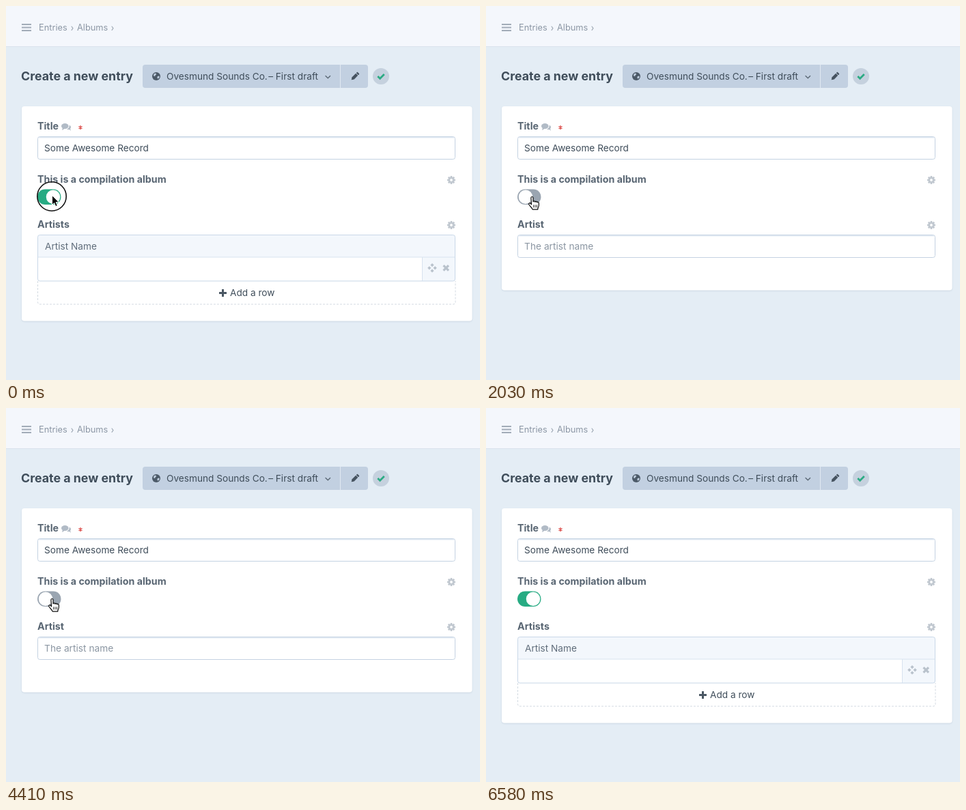
Recreate the animation shown at these times as an HTML page. Size 694 px wide and 548 px high, loop 6650 ms.

```html
<!DOCTYPE html>
<html lang="en">
<head>
<meta charset="utf-8">
<title>Entry form</title>
<style>
  html, body { margin: 0; width: 100%; height: 100%; overflow: hidden; background: #e4edf5; }
  svg { display: block; width: 100%; height: 100%; }
  text { font: 13.65px Inter, "Open Sans", sans-serif; fill: #3f4d5a; white-space: pre; }
  .crumb { font-size: 12.8px; fill: #8c97a5; }
  .heading { font-size: 17.8px; font-weight: 700; }
  .label { font-size: 14.25px; font-weight: 700; fill: #596673; }
  .column { fill: #606d7b; }
  .hint { font-size: 13.75px; fill: #8c97a3; }
  .field { fill: #fff; stroke: #c4d2e2; }
  .line { fill: none; stroke-linecap: round; stroke-linejoin: round; }
</style>
</head>
<body>
<svg viewBox="0 0 694 548" xmlns="http://www.w3.org/2000/svg">
  <defs>
    <filter id="shadow" x="-5%" y="-5%" width="110%" height="110%">
      <feDropShadow dx="0" dy="1" stdDeviation="1.2" flood-color="#8fa3b8" flood-opacity=".3"/>
    </filter>
    <g id="gear">
      <g stroke="#c1c8d0" stroke-width="2.6">
        <path d="M0-6V6M-6 0H6"/>
        <path d="M0-6V6M-6 0H6" transform="rotate(45)"/>
      </g>
      <circle r="3.2" fill="none" stroke="#c1c8d0" stroke-width="2.8"/>
      <circle r="1.9" fill="#fff"/>
    </g>
    <g id="field">
      <rect class="field" x="46.5" width="611" height="33" y=".5" rx="3"/>
      <path d="M48 1.7H656" stroke="#e2eaf3" stroke-width="1.4"/>
    </g>
  </defs>

  <rect width="694" height="548" fill="#e4edf5"/>
  <rect width="694" height="59" fill="#f4f7fc"/>
  <path d="M0 59.5H694" stroke="#d9e2ec"/>
  <path d="M23 27H37M23 31.5H37M23 36H37" stroke="#a2acb8" stroke-width="2"/>
  <text class="crumb" x="48" y="36">Entries</text>
  <text class="crumb" x="104" y="36">Albums</text>
  <path class="line" d="M96 30l2 2.700-2 2.700M155 30l2 2.700-2 2.700" stroke="#9ca6b2" stroke-width="1.1"/>

  <text class="heading" x="22" y="109">Create a new entry</text>
  <rect x="200" y="86" width="330" height="34" rx="4" fill="#c2d0e1"/>
  <path d="M489.500 86V120" stroke="#e1e9f2"/>
  <circle cx="220" cy="103" r="6" fill="#4c5a68"/>
  <path d="M216.500 99.500l2.500-1 1.300 1.600-1.700 1.300-.5 1.600-2-.4zM221.500 103.500l2.600-1.200.7 2-2 2.400-1.300-1.300z" fill="#c2d0e1"/>
  <text x="235" y="108">Ovesmund Sounds Co.</text>
  <text x="457" y="108" text-anchor="end">– First draft</text>
  <path class="line" d="M468 102.500l3.300 3.200 3.300-3.200" stroke="#596673" stroke-width="1.300"/>
  <g transform="translate(511 103) rotate(45)" fill="#45525f">
    <path d="M-2.200-3.800H2.200V4L0 7.500-2.200 4z"/>
    <rect x="-2.200" y="-7" width="4.400" height="2.300" rx=".8"/>
  </g>

  <g id="saved">
    <circle cx="549" cy="103" r="12" fill="#c5d1de"/>
    <path d="M544.300 103l3.300 3.300 6.200-6.300" fill="none" stroke="#2dab84" stroke-width="2.700"/>
  </g>
  <g id="spinner" transform="translate(548 102.500)"></g>

  <rect id="panel" x="23" y="147" width="659.500" rx="4" fill="#fff" filter="url(#shadow)"/>
  <text class="label" x="46" y="181">Title</text>
  <g fill="#b1bbc6">
    <path d="M89 180.500c3 1.500 6 0 6-3 0-1.500-1-2.600-2.300-3.100.3 3.600-1.700 5.300-3.700 6.100zM92 180.500l3 2.200-1-3z"/>
    <ellipse cx="86.300" cy="176" rx="5.300" ry="4"/>
    <path d="M83 178l-1 4 4-2.200z"/>
  </g>
  <path d="M109 175V181M106.400 176.500l5.200 3M111.600 176.500l-5.200 3" stroke="#dc4d4a" stroke-width="1.300"/>
  <use href="#field" y="191"/>
  <text x="56" y="213">Some Awesome Record</text>

  <text class="label" x="46" y="259">This is a compilation album</text>
  <use href="#gear" x="652" y="255"/>
  <use href="#gear" x="652" y="321"/>
  <rect id="track" x="46" y="268.500" width="34.500" height="22.500" rx="11.250"/>
  <circle id="knob" cy="279.750" r="10.250" fill="#fff"/>

  <g id="single">
    <text class="label" x="46" y="325">Artist</text>
    <use href="#field" y="335"/>
    <text class="hint" x="56" y="357">The artist name</text>
  </g>

  <g id="multiple">
    <text class="label" x="46" y="325">Artists</text>
    <path d="M46.500 403V433.500q0 3.500 3.500 3.500H654.500q3.500 0 3.500-3.500V403" fill="none" stroke="#d3dae2" stroke-dasharray="3 2"/>
    <rect x="46.500" y="335.500" width="611" height="67.500" rx="3" fill="#f3f7fc"/>
    <rect x="47" y="368" width="563" height="34.500" fill="#fff"/>
    <path d="M47 368H657.500M609.500 368V403" stroke="#d8e3ef"/>
    <rect x="46.500" y="335.500" width="611" height="67.500" rx="3" fill="none" stroke="#c9d8e8"/>
    <text class="column" x="57" y="357">Artist Name</text>
    <path d="M624 377l2.600 2.600-2.600 2.600-2.600-2.600zM624 385.400l2.600 2.600-2.600 2.600-2.600-2.600zM619.800 381.200l2.600 2.600-2.600 2.600-2.600-2.600zM628.200 381.200l2.600 2.600-2.600 2.600-2.600-2.600z" fill="#b9c2cc"/>
    <path d="M640.500 380.200l7.500 7.500M648 380.200l-7.500 7.500" stroke="#b9c2cc" stroke-width="3.200"/>
    <path d="M317.500 415V426M312 420.500H323" stroke="#4a5763" stroke-width="3"/>
    <text x="328" y="425">Add a row</text>
  </g>

  <circle id="ring" cx="67" cy="279" r="21.200" fill="none" stroke="#111" stroke-width="1.600"/>
  <path id="arrow" d="M67.500 277.500V291.500l3.100-2.900 2.200 5 2.500-1.100-2.200-4.900h4.300z" fill="#000" stroke="#fff"/>
  <g id="hand" transform="translate(67 279.500) scale(1.13) translate(-67 -279.500)">
    <path class="line" d="M66 281c0-2 2.800-2 2.800 0v5c.4-1.300 2.500-1.100 2.500.3.400-1.100 2.400-.9 2.400.5.500-.9 2.500-.5 2.500 1v2.600c0 2.300-1.400 3-1.500 5.600h-6.700c-.6-2.200-3.200-4-4.600-6.300-1-1.700.8-2.800 2-1.500l1.200 1.300z" style="fill:#fff" stroke="#111" stroke-width="1.100"/>
    <path d="M69.400 290V293.500M71.500 290V293.500M73.600 290V293.500" stroke="#111" stroke-width=".8"/>
  </g>
</svg>
<script>
const LOOP = 6650, STEP = 70;
const SLIDE = 210;
const KNOB_ON = 69, KNOB_OFF = 58;

// Each click flips the switch and saves the draft until `done`.
const clicks = [
  { at: 770, done: 1190, on: false },
  { at: 2100, done: 2450, on: true },
  { at: 3390, done: 3850, on: false },
  { at: 4590, done: 4900, on: true }
];

const el = id => document.getElementById(id);
const show = (id, visible) => el(id).setAttribute("display", visible ? "inline" : "none");
const clamp = v => Math.max(0, Math.min(1, v));
const swing = p => 0.5 - Math.cos(Math.PI * p) / 2;

const spokes = Array.from({ length: 12 }, (_, i) => {
  const spoke = document.createElementNS("http://www.w3.org/2000/svg", "path");
  spoke.setAttribute("d", "M0-4.500V-8.800");
  spoke.setAttribute("class", "line");
  spoke.setAttribute("stroke", "#7d8998");
  spoke.setAttribute("stroke-width", 1.2);
  spoke.setAttribute("transform", `rotate(${i * 30})`);
  return el("spinner").appendChild(spoke);
});

function drawSpinner(age) {
  const head = Math.floor(age / STEP);
  spokes.forEach((spoke, i) => {
    const lag = (head - i + 12) % 12;
    spoke.setAttribute("opacity", Math.max(0.08, 0.9 - lag * 0.09));
  });
}

function drawSwitch(on, progress) {
  const from = on ? KNOB_OFF : KNOB_ON;
  const to = on ? KNOB_ON : KNOB_OFF;
  el("knob").setAttribute("cx", from + (to - from) * swing(progress));
  el("track").setAttribute("fill", on ? "#27ab83" : "#9aa5b1");
}

function draw(time) {
  const t = Math.floor((time % LOOP) / STEP) * STEP;
  const click = clicks.filter(c => c.at <= t).pop();
  const on = click ? click.on : true;
  const saving = Boolean(click) && t < click.done;

  drawSwitch(on, click ? clamp((t - click.at) / SLIDE) : 1);
  if (saving) drawSpinner(t - click.at);
  show("spinner", saving);
  show("saved", !saving);
  show("multiple", on);
  show("single", !on);
  el("panel").setAttribute("height", on ? 314.5 : 269.5);

  el("ring").setAttribute("opacity", clamp(1 - t / 280));
  show("arrow", t < 420);
  show("hand", t >= 420 && t < 5740);
}

const start = performance.now();
function tick() {
  draw(performance.now() - start);
  requestAnimationFrame(tick);
}
tick();
</script>
</body>
</html>
```
